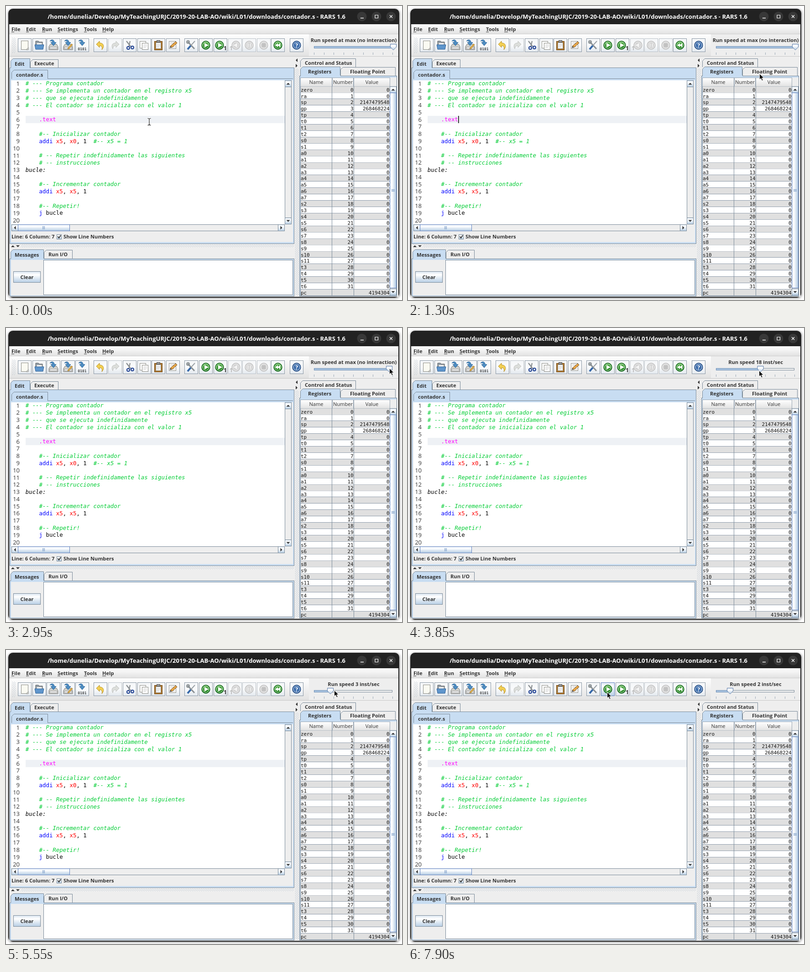
An HTML page for the animation above (8000 ms loop, 868x645 px).

```html
<!DOCTYPE html>
<html lang="es">
<head>
<meta charset="utf-8">
<title>Simulador</title>
<style>
html, body { margin: 0; width: 100%; height: 100%; overflow: hidden; background: #fff; }
svg { display: block; width: 868px; height: 645px; }
text { white-space: pre; font: 11.15px "Open Sans", "Noto Sans", sans-serif; fill: #333; }
.b { font-weight: 700; }
.title { font-weight: 700; font-size: 13.06px; fill: #fff; }
.num { font-size: 13px; }
.code { font: 12.37px "DejaVu Sans Mono", monospace; fill: #000; }
.reg { font: 11px "DejaVu Sans Mono", monospace; letter-spacing: -.12px; fill: #111; }
.com { fill: #0c3; font-style: italic; }
.dir { fill: #f0f; }
.ins { fill: #00f; }
.rg { fill: #f00; }
.lab { font-style: italic; }
</style>
</head>
<body>
<svg id="stage" viewBox="0 0 868 645" xmlns="http://www.w3.org/2000/svg"></svg>
<script>
const LINE = '#7a8a99', PANEL = '#eee', BLUE = '#c8ddf2';
const out = [];
const add = s => out.push(s);
const path = (d, fill, stroke, w = 1) =>
  add(`<path d="${d}" fill="${fill || 'none'}" stroke="${stroke || 'none'}" stroke-width="${w}"/>`);
const rect = (x, y, w, h, fill, stroke) => stroke
  ? add(`<rect x="${x + .5}" y="${y + .5}" width="${w - 1}" height="${h - 1}" fill="${fill}" stroke="${stroke}"/>`)
  : add(`<rect x="${x}" y="${y}" width="${w}" height="${h}" fill="${fill}"/>`);
const text = (x, y, s, cls = 'b', anchor = 'start', more = '') =>
  add(`<text x="${x}" y="${y}" class="${cls}" text-anchor="${anchor}" ${more}>${s}</text>`);
const disc = (x, y, r, fill, stroke, w = 1) =>
  add(`<circle cx="${x}" cy="${y}" r="${r}" fill="${fill}" stroke="${stroke || 'none'}" stroke-width="${w}"/>`);
const tri = (x, y, dir, s = 4) => add(
  `<path d="M${-s} ${s / 2}H${s}L0 ${-s / 2}Z" fill="#333" transform="translate(${x} ${y}) rotate(${dir})"/>`);
const tab = (x, y, w, h, label, tx, on) => {
  path(`M${x + .5} ${y + h}V${y + 5.5}L${x + 5.5} ${y + .5}H${x + w - .5}V${y + h}`, on ? BLUE : PANEL, LINE);
  text(tx, y + h - 5.5, label);
};
const scrollButton = (x, y, dir) => {
  rect(x, y, 15, 15, 'url(#btn)', LINE);
  tri(x + 7.5, y + 7.5, dir);
};

add(`<defs>
<linearGradient id="btn" x2="0" y2="1"><stop stop-color="#dde8f3"/><stop offset=".3" stop-color="#fff"/><stop offset="1" stop-color="#b8cfe5"/></linearGradient>
<linearGradient id="tool" x2="0" y2="1"><stop stop-color="#f4f6f8"/><stop offset=".5" stop-color="#fafbfc"/><stop offset="1" stop-color="#e2e8ee"/></linearGradient>
<linearGradient id="bar" x2="0" y2="1"><stop stop-color="#fff"/><stop offset="1" stop-color="#e2e2e2"/></linearGradient>
<linearGradient id="thumbV"><stop stop-color="#dfeaf6"/><stop offset=".3" stop-color="#fff"/><stop offset="1" stop-color="#b0c9e2"/></linearGradient>
<linearGradient id="thumbH" x2="0" y2="1"><stop stop-color="#dfeaf6"/><stop offset=".3" stop-color="#fff"/><stop offset="1" stop-color="#b0c9e2"/></linearGradient>
<linearGradient id="green" x2="0" y2="1"><stop stop-color="#62b854"/><stop offset="1" stop-color="#147a14"/></linearGradient>
<pattern id="bumps" width="4" height="4" patternUnits="userSpaceOnUse"><path d="M0 0h1v1h-1zM2 2h1v1h-1z" fill="#9aa8b6"/><path d="M1 1h1v1h-1zM3 3h1v1h-1z" fill="#fff"/></pattern>
<filter id="soft"><feGaussianBlur stdDeviation="2"/></filter>
</defs>`);

// window frame
add('<rect x="4" y="6" width="860" height="636" rx="11" fill="#aaa" filter="url(#soft)"/>');
add('<rect x="5" y="6" width="857" height="634" rx="10" fill="#222"/>');
rect(7, 40, 853, 598, PANEL);
text(417.5, 28, '/home/dunelia/Develop/MyTeachingURJC/2019-20-LAB-AO/wiki/L01/downloads/contador.s - RARS 1.6', 'title', 'middle');
[780, 812, 844].forEach(x => disc(x, 23, 10.5, '#383838'));
path('M777 26.5h7M841 20l6 6m0-6l-6 6', '', '#fff', 1.3);
path('M809 20h6.5v6.5h-6.5z', '', '#fff', 1.2);

// menu
rect(7, 40, 853, 21, 'url(#bar)');
[['File', 12, 6], ['Edit', 44, 6], ['Run', 79, 7], ['Settings', 113, 6], ['Tools', 171, 6], ['Help', 211, 8]]
  .forEach(([s, x, w]) => { text(x, 55, s); rect(x, 56.5, w, 1, '#333'); });

// toolbar
rect(7, 61, 657, 49, 'url(#bar)');
rect(7, 61, 853, 1, '#d0d0d0');
rect(7, 110, 853, 1, '#c8c8c8');
rect(14, 70, 8, 33, 'url(#bumps)');
const keys = [26, 58, 89, 121, 152, 192, 224, 256, 288, 319, 351, 391, 423, 455, 487, 518, 550, 581, 622];
const off = [6, 14, 15, 16];
keys.forEach((x, i) => rect(x, 71, 30, 30, 'url(#tool)', off.includes(i) ? '#bcc3ca' : '#8b98a5'));
add('<rect id="hover" x="423.5" y="71.5" width="29" height="29" fill="url(#btn)" stroke="#6382bf"/>');

const icon = (i, draw) => {
  add(`<g transform="translate(${keys[i] + 15} 86)">`);
  draw();
  add('</g>');
};
const page = (x, y, w, h, c = '#fff') => rect(x, y, w, h, c, '#8d8d86');
const drive = () => {
  path('M-10 3L-7-2H7L10 3V10H-10Z', '#d2d3cf', '#777');
  path('M-8 4H8V8H-8Z', '#eee', '#999');
};
const arrowDown = (x, y) => path(`M${x - 8} ${y - 6}c4-5 10-3 10 3h4l-6 7-6-7h4c0-3-2-4-6-3z`, '#4f8fc4', '#245f96');
icon(0, () => { page(-8, -10, 16, 20, '#fafaf2'); path('M3 10L8 5V10Z', '#ddd', '#8d8d86'); });
icon(1, () => {
  path('M-8-9H-2L0-7H7V5H-8Z', '#93a1ad', '#555');
  path('M-6-5H6V3H-6Z', '#fff', '#999');
  path('M-10-1H10L8 9H-8Z', '#5e95cc', '#2d5f94');
});
icon(2, () => { drive(); arrowDown(0, -3); });
icon(3, () => {
  drive(); arrowDown(0, -3);
  path('M0 6L8-3L10-1L2 8L-1 8Z', '#f0ba4d', '#82601e', .8);
});
icon(4, () => { arrowDown(0, -3); text(0, 11, '0101', 'code', 'middle', 'style="font-size:7.8px"'); });
const turn = (fill, stroke, flip) => path(
  flip ? 'M9-2L2-9V-5C-6-5-9 0-5 8C-4 3-2 1 2 1V5Z' : 'M-9-2L-2-9V-5C8-5 9 4 3 10C5 4 2 1-2 1V5Z', fill, stroke);
icon(5, () => turn('#f2cf53', '#b8902a'));
icon(6, () => turn('#dcdedb', '#c0c2c0', true));
icon(7, () => {
  path('M-7-9L4 5M1-9L-2 4', '', '#8a8f92', 2.3);
  disc(-3, 6, 3, 'none', '#1d3f92', 2);
  disc(6, 5, 3, 'none', '#1d3f92', 2);
});
icon(8, () => {
  page(-10, -9, 14, 16); page(-5, -5, 14, 15);
  path('M-2-1H6M-2 2H6M-2 5H4', '', '#c5c5c5');
});
icon(9, () => {
  rect(-9, -9, 18, 20, '#b1792e', '#6d4616'); page(-6, -6, 12, 14);
  rect(-4, -11, 8, 5, '#999', '#555');
  path('M-4-2H4M-4 1H4M-4 4H2', '', '#bbb');
});
icon(10, () => {
  page(-9, -9, 16, 17); path('M-6-5H4M-6 4H4', '', '#aaa');
  path('M-6 2L6-8L9-5L-2 5Z', '#e9a84a', '#714c1c');
  path('M-6 2L-7 6L-2 5Z', '#444');
});
icon(11, () => {
  path('M-8-8L7 8', '', '#8b9194', 3);
  path('M8-9L-2 2', '', '#9aa0a5', 2);
  path('M-1 1L-8 9', '', '#3567a8', 4);
  disc(-7, -7, 3, 'none', '#8b9194', 2);
});
const play = (x, fill = 'url(#green)', edge = '#13661a') => {
  disc(x, 0, 9, fill, edge, 1.4);
  disc(x, 0, 7, 'none', '#fff', .8);
};
icon(12, () => { play(0); path('M-3-5L6 0L-3 5Z', '#fff'); });
icon(13, () => {
  play(-2); path('M-5-5L4 0L-5 5Z', '#fff');
  text(7, 11, '1', 'b', 'start', 'style="font-size:12px"');
});
icon(14, () => {
  play(2, '#d2d2d2', '#c2c2c2'); path('M5-5L-4 0L5 5Z', '#f2f2f2');
  text(-12, 11, '1', 'b', 'start', 'style="font-size:12px;fill:#bbb"');
});
icon(15, () => { play(0, '#d2d2d2', '#c2c2c2'); path('M-2.5-4V4M2.5-4V4', '', '#f4f4f4', 2); });
icon(16, () => { play(0, '#d2d2d2', '#c2c2c2'); rect(-4, -4, 8, 8, '#c2c2c2'); });
icon(17, () => { play(0); path('M0-4.5L-6 0L0 4.5ZM5-4.5L-1 0L5 4.5Z', '#fff'); });
icon(18, () => {
  disc(0, 0, 9, '#3c6dac', '#254c80', 1.4); disc(0, 0, 7, 'none', '#fff', .8);
  text(0, 5, '?', 'b', 'middle', 'style="font-size:13px;fill:#fff"');
});

// speed slider
add('<text id="speed" x="762" y="79" class="b" text-anchor="middle"></text>');
rect(675, 88, 172, 5, '#f2f2f2', LINE);
add('<rect id="fill" x="675.5" y="88.5" width="170" height="4" fill="#a9c4e0" stroke="#6f8fb5"/>');
for (let i = 0; i < 9; i++) rect(Math.round(675 + i * 21.5), 102, 1, 5, '#9aa8b6');
add('<path id="thumb" d="M-6.5 83.5H6.5V90L0 96.5L-6.5 90Z" fill="url(#btn)" stroke="#5f7ca8"/>');

// editor panel
tab(10, 115, 43, 21, 'Edit', 19, true);
tab(53, 117, 62, 18, 'Execute', 62);
rect(8, 135, 624, 387, BLUE, LINE);
rect(11, 163, 618, 355, PANEL);
rect(11, 135, 41, 2, BLUE);
tab(12, 140, 80, 20, 'contador.s', 22, true);
rect(92, 159, 537, 1, LINE);
rect(12, 163, 599, 316, '#fff');
rect(43, 241, 568, 16, '#eef1f5');

const source = `# --- Programa contador
# --- Se implementa un contador en el registro x5
# --- que se ejecuta indefinidamente
# --- El contador se inicializa con el valor 1

    .text

    #-- Inicializar contador
    addi x5, x0, 1  #-- x5 = 1

    # -- Repetir indefinidamente las siguientes
    # -- instrucciones
bucle:

    #-- Incrementar contador
    addi x5, x5, 1

    #-- Repetir!
    j bucle
`.split('\n');
const kinds = [[/^#/, 'com'], [/^\./, 'dir'], [/^(addi|j)$/, 'ins'], [/^x\d/, 'rg'], [/:$/, 'lab']];
const paint = s => s.replace(/#.*|\.text|\baddi\b|\bj\b|x\d|^\w+:/g, m =>
  `<tspan class="${kinds.find(k => k[0].test(m))[1]}">${m}</tspan>`);
source.forEach((s, i) => {
  const y = 174.3 + i * 15.78;
  text(30, y + .4, i + 1, 'num', 'end');
  if (s) text(42.8, y, paint(s), 'code');
});
add('<rect id="caret" x="110" y="241" width="1.5" height="16" fill="#000"/>');

rect(611, 163, 15, 316, PANEL, LINE);
scrollButton(611, 163, 0);
scrollButton(611, 464, 180);
rect(12, 479, 599, 15, PANEL, LINE);
scrollButton(12, 479, -90);
scrollButton(596, 479, 90);
rect(26, 479, 114, 15, 'url(#thumbH)', '#6382bf');
path('M80.5 483v7M82.5 483v7M84.5 483v7', '', '#7f9fc8');
text(12, 510, 'Line: 6 Column: 7');
rect(111, 501, 11, 11, 'url(#btn)', LINE);
path('M113.5 505.5L116 509L120 503', '', '#222', 1.7);
text(126, 510, 'Show Line Numbers');

// dividers
rect(34, 524, 598, 6, 'url(#bumps)');
tri(15, 527, 0);
tri(26, 527, 180);
rect(634, 138, 7, 498, 'url(#bumps)');
tri(637, 119, -90);
tri(637, 131, 90);

// messages
tab(10, 534, 73, 21, 'Messages', 19, true);
tab(83, 535, 63, 19, 'Run I/O', 93);
rect(8, 554, 624, 83, BLUE, LINE);
rect(11, 557, 618, 78, PANEL);
rect(11, 554, 72, 2, BLUE);
rect(82, 557, 547, 77, '#fff', LINE);
rect(16, 582, 60, 25, 'url(#btn)', LINE);
text(46, 598.5, 'Clear', 'b', 'middle');

// registers
tab(645, 115, 122, 19, 'Control and Status', 655);
tab(733, 134, 121, 19, 'Floating Point', 754);
rect(643, 153, 214, 484, BLUE, LINE);
tab(645, 133, 88, 20, 'Registers', 662, true);
rect(646, 152, 87, 3, BLUE);
rect(645, 157, 211, 478, PANEL);
[[645, 70, 'Name'], [715, 47, 'Number'], [762, 80, 'Value']].forEach(([x, w, s]) => {
  rect(x, 157, w, 20, 'url(#bar)', '#9aa7b4');
  text(x + w / 2, 171, s, '', 'middle');
});
const names = ('zero ra sp gp tp t0 t1 t2 s0 s1 a0 a1 a2 a3 a4 a5 a6 a7 ' +
  's2 s3 s4 s5 s6 s7 s8 s9 s10 s11 t3 t4 t5 t6 pc').split(' ');
const values = { sp: 2147479548, gp: 268468224, pc: 4194304 };
names.forEach((s, i) => {
  const y = 176.5 + i * 13.92, base = 187.6 + i * 13.92;
  rect(645, y, 197, 13.92, i % 2 ? '#fff' : '#e0e0e0');
  rect(645, Math.round(y + 13), 197, 1, '#8f9cab');
  text(646, base, s, 'reg');
  if (s !== 'pc') text(761.5, base, i, 'reg', 'end');
  text(840.5, base, values[s] || 0, 'reg', 'end');
});
[645, 714, 762, 841].forEach(x => rect(x, 176, 1, 459, LINE));
rect(841, 176, 15, 459, PANEL, LINE);
scrollButton(841, 176, 0);
scrollButton(841, 620, 180);
rect(841, 190, 15, 429, 'url(#thumbV)', '#6382bf');
path('M845 402.5h7M845 404.5h7M845 406.5h7', '', '#7f9fc8');

// pointers
const beam = 'M-3.5-7.5C-1-7.5 0-7 0-5.5V5.5C0 7-1 7.5-3.5 7.5M3.5-7.5C1-7.5 0-7 0-5.5M0 5.5C0 7 1 7.5 3.5 7.5';
add('<g id="beam">');
path(beam, '', '#fff', 2.6);
path(beam, '', '#222', 1.2);
add('</g>');
add('<path id="arrow" d="M.5.5V13.5L3.6 10.8L5.8 16L8.2 15L6 10H10.2Z" fill="#111" stroke="#fff" stroke-width=".9"/>');

document.getElementById('stage').innerHTML = out.join('');
const $ = id => document.getElementById(id);

// time, x, y
const mouse = [
  [450, 314, 254], [600, 314, 281], [700, 315, 255], [800, 317, 198], [950, 420, 172], [1150, 640, 155],
  [1300, 770, 148], [1550, 770, 148], [2100, 815, 115], [2400, 848, 95], [2500, 848, 89], [2750, 848, 89],
  [2950, 840, 88], [3550, 805, 92], [3850, 769, 93], [4400, 727, 94], [4750, 711, 94], [5500, 711, 94],
  [5550, 719, 88], [6300, 719, 88], [6500, 715, 89], [6600, 715, 89], [6850, 704, 89], [7450, 704, 89],
  [7550, 668, 113], [7600, 632, 125], [7650, 595, 116], [7700, 562, 99], [7850, 562, 99], [7900, 436, 92]
];
const knob = [
  [2700, 849], [2950, 840], [3550, 808], [3850, 772.5], [4400, 729], [4750, 711], [5650, 711],
  [5700, 714], [6300, 714], [6500, 710.5], [6600, 710.5], [6850, 704.5], [7300, 704.5], [7350, 706]
];
const at = (keys, t, c) => {
  const i = keys.findIndex(k => k[0] > t);
  if (i < 0) return keys[keys.length - 1][c];
  if (!i) return keys[0][c];
  const a = keys[i - 1], b = keys[i];
  return a[c] + (b[c] - a[c]) * (t - a[0]) / (b[0] - a[0]);
};
const caretOn = [[150, 650], [1150, 1650], [2150, 2750]];
const show = (id, on) => $(id).setAttribute('visibility', on ? 'visible' : 'hidden');

function draw(now) {
  const t = Math.floor(now % 8000 / 50) * 50;
  const x = Math.round(at(mouse, t, 1)), y = Math.round(at(mouse, t, 2));
  const inText = x < 611 && y > 162;
  show('beam', inText);
  show('arrow', !inText);
  $(inText ? 'beam' : 'arrow').setAttribute('transform', `translate(${x} ${y})`);
  show('caret', caretOn.some(([a, b]) => t >= a && t < b));
  show('hover', t >= 7900);

  const k = at(knob, t, 1), step = Math.round((k - 674.6) / 4.3);
  $('thumb').setAttribute('transform', `translate(${k} 0)`);
  $('fill').setAttribute('width', Math.min(171, k - 675.5));
  $('speed').textContent = step > 35 ? 'Run speed at max (no interaction)' : `Run speed ${step - 5} inst/sec`;
}
function loop() {
  draw(performance.now());
  requestAnimationFrame(loop);
}
loop();
</script>
</body>
</html>
```
